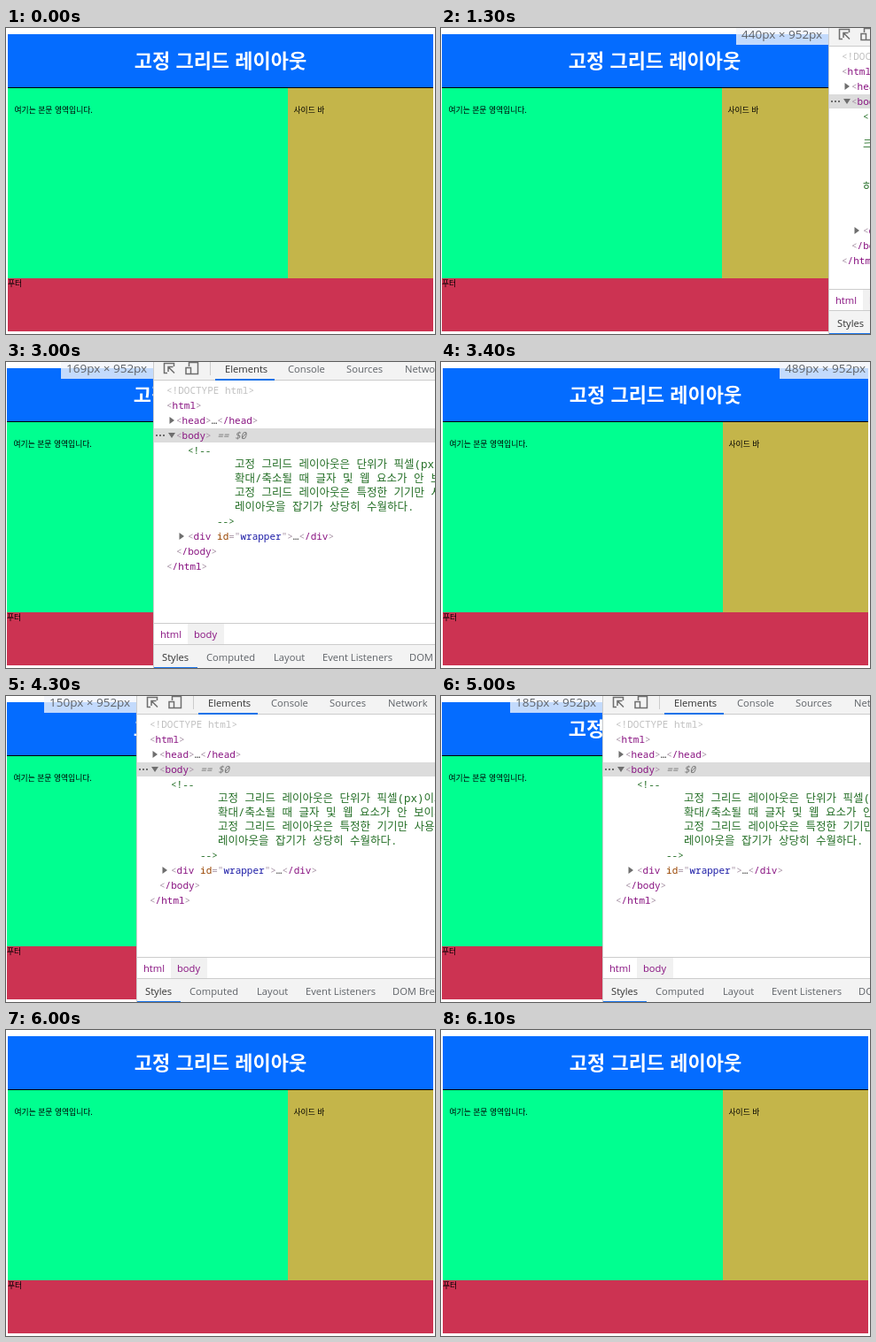
Write an HTML page that moves like this. It is 484x346 px and loops after 6700 ms.

```html
<!DOCTYPE html>
<html lang="ko">
<head>
<meta charset="utf-8">
<style>
  html, body { margin: 0; width: 100%; height: 100%; overflow: hidden; background: #fff; }
  svg { display: block; width: 484px; height: 346px; }
  text { white-space: pre; }
  #page { font: 8.8px "Noto Sans CJK KR", "Noto Sans CJK JP", "Noto Sans CJK", sans-serif; }
  #title { font-size: 22px; font-weight: 700; fill: #fff; text-anchor: middle; }
  #tools, #label { font: 11.2px "Open Sans", sans-serif; fill: #5f6368; }
  #label { font-size: 13.5px; }
  .code { font: 11px "Noto Sans Mono", monospace; fill: #a894a6; }
  .korean { font: 12.5px "Noto Sans Mono", "Noto Sans CJK KR", "Noto Sans CJK JP", "Noto Sans CJK", monospace; }
  .tag { fill: #881280; }
  .attr { fill: #994500; }
  .value { fill: #1a1aa6; }
  .comment { fill: #236e25; }
  .doctype { fill: #c0c0c0; }
  .hint { fill: #777; font-style: italic; }
  .active { fill: #333; }
  .icon { fill: none; stroke: #6e6e6e; stroke-width: 1.5; }
  .arrow { fill: #6e6e6e; }
</style>
</head>
<body>
<svg viewBox="0 0 484 346">
  <g id="page">
    <rect x="2" y="7" width="480" height="60" fill="#046cff"/>
    <rect x="2" y="67" width="480" height="1"/>
    <rect x="2" y="68" width="316" height="215" fill="#00ff90"/>
    <rect x="318" y="68" width="164" height="215" fill="#c4b54a"/>
    <rect x="2" y="283" width="480" height="60" fill="#cc3352"/>
    <text id="title" x="242" y="44.5">고정 그리드 레이아웃</text>
    <text x="9.500" y="96">여기는 본문 영역입니다.</text>
    <text x="324.500" y="96">사이드 바</text>
    <text x="2" y="292">푸터</text>
  </g>
  <g id="tools">
    <rect width="484" height="346" fill="#fff"/>
    <rect width="484" height="20" fill="#f3f3f3"/>
    <rect y="20" width="484" height="1" fill="#ccc"/>
    <path class="icon" d="M16 12.5H12.5V1.5H23.5V5M17 5.5L24 12.5M17 11V5.5H22.5"/>
    <path class="icon" d="M40.5 5V0.5H50.5V13.5H43M37 6.5H42.5V13.5H37Z"/>
    <rect x="64" width="1" height="15" fill="#ccc"/>
    <rect x="70" y="19" width="67" height="2" fill="#1a73e8"/>
    <rect y="75" width="484" height="16" fill="#dcdcdc"/>
    <g id="source"></g>
    <rect y="295" width="484" height="1" fill="#ccc"/>
    <rect x="39" y="296" width="41" height="23" fill="#f1f1f1"/>
    <rect y="319" width="484" height="27" fill="#f3f3f3"/>
    <rect y="319" width="484" height="1" fill="#ccc"/>
    <rect y="345" width="50" height="1" fill="#1a73e8"/>
    <g id="tabs"></g>
    <rect width="1" height="346" fill="#ccc"/>
  </g>
  <g id="label">
    <rect width="104" height="19" fill="#f3f6fc" fill-opacity=".8"/>
    <text id="size" x="6" y="12"></text>
  </g>
</svg>
<script>
const byId = id => document.getElementById(id);
const LOOP = 6700, FULL = 489;

// [time in ms, viewport width]; each width holds until the next entry
const drag = [
  [0, 489], [1200, 465], [1300, 440],
  [1500, 406], [1600, 373], [1700, 340], [1800, 307], [1900, 274], [2000, 240], [2100, 207], [2200, 150],
  [3000, 169], [3100, 255], [3200, 352], [3300, 438], [3400, 489],
  [4000, 440], [4100, 320], [4200, 205], [4300, 150],
  [5000, 185], [5100, 280], [5200, 388], [5300, 489]
];

const span = (cls, text) => `<tspan class="${cls}">${text}</tspan>`;
const tag = (name, attrs = '') => `&lt;${span('tag', name)}${attrs}&gt;`;
const text = (x, y, body, cls = '') => `<text x="${x}" y="${y}" class="${cls}">${body}</text>`;
const shape = d => `<path class="arrow" d="${d}"/>`;
const right = (x, y) => shape(`M${x} ${y - 4}l5.500 4l-5.500 4z`);
const down = (x, y) => shape(`M${x} ${y - 3}h8l-4 6z`);
const dots = (x, y) => shape([0, 4, 8].map(dx => `M${x + dx} ${y}h2v2h-2z`).join(''));

function sourceRows(wrapped) {
  const note = line => [92, line, 'code korean comment'];
  const rest = line => wrapped ? [[39, line, 'code korean comment']] : [];
  const wrapper = ` ${span('attr', 'id')}="${span('value', 'wrapper')}"`;
  const folded = (name, attrs) => tag(name, attrs) + span('active', '…') + tag('/' + name);
  const rows = [
    [15, '&lt;!DOCTYPE html&gt;', 'code doctype'],
    [15, tag('html')],
    [26, folded('head'), 'code', y => right(18.5, y)],
    [26, tag('body') + span('hint', ' == $0'), 'code', y => down(17, y) + dots(3, y - 1)],
    [39, '&lt;!--', 'code comment'],
    note('고정 그리드 레이아웃은 단위가 픽셀(px)이므로'),
    ...rest('크기가'),
    note('확대/축소될 때 글자 및 웹 요소가 안 보이거나'),
    note('고정 그리드 레이아웃은 특정한 기기만 사용'),
    ...rest('하면 유리하다.'),
    note('레이아웃을 잡기가 상당히 수월하다.'),
    [72, '--&gt;', 'comment code'],
    [39, folded('div', wrapper), 'code', y => right(29.5, y)],
    [26, tag('/body')],
    [15, tag('/html')]
  ];
  let y = 32;
  return rows.map(([x, body, cls = 'code', marks = () => '']) => {
    const row = marks(y) + text(x, y + 4, body, cls);
    y += cls.endsWith('comment') ? 16 : 17;
    return row;
  }).join('');
}

byId('tabs').innerHTML = [
  [81, 12, 'Elements', 'active'], [152, 12, 'Console'], [218, 12, 'Sources'], [284, 12, 'Network'],
  [8, 312, 'html', 'tag'], [46, 312, 'body', 'tag'],
  [10, 338, 'Styles', 'active'], [60, 338, 'Computed'], [136, 338, 'Layout'],
  [191, 338, 'Event Listeners'], [289, 338, 'DOM Breakpoints']
].map(args => text(...args)).join('');

const layouts = { true: sourceRows(true), false: sourceRows(false) };
let shownWidth;

function draw(now) {
  const t = now % LOOP;
  const width = drag.findLast(([start]) => start <= t)[1];
  byId('label').style.display = t >= 1200 && t < 5700 ? '' : 'none';
  if (width !== shownWidth) {
    shownWidth = width;
    const edge = width - 3;
    byId('page').setAttribute('transform', `translate(${width < FULL ? -1 : 0} 0)`);
    byId('tools').setAttribute('transform', `translate(${edge} 0)`);
    byId('label').setAttribute('transform', `translate(${edge - 104} 0)`);
    byId('size').textContent = `${width}px × 952px`;
    byId('source').innerHTML = layouts[edge > 220];
  }
  requestAnimationFrame(() => draw(performance.now()));
}
draw(performance.now());
</script>
</body>
</html>
```
